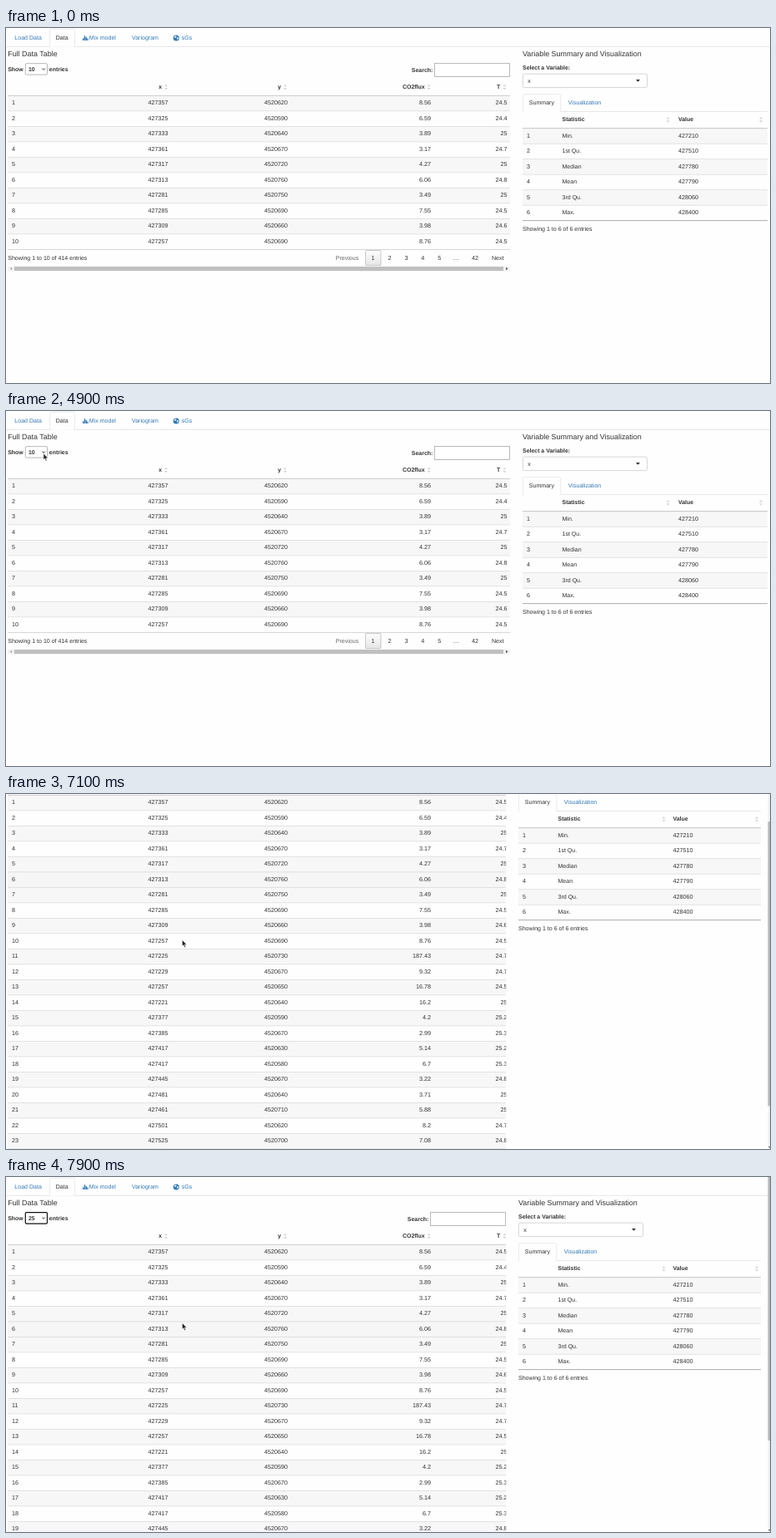
Animation of 917 by 427 pixels, one loop 8000 ms. Source, as an HTML page:

```html
<!DOCTYPE html>
<html lang="en">
<head>
<meta charset="utf-8">
<title>Data table</title>
<style>
html, body { margin: 0; width: 100%; height: 100%; overflow: hidden; background: #fefefe; }
svg { display: block; }
text { font: 7.05px "Liberation Sans", Arial, sans-serif; fill: #333; white-space: pre; text-rendering: geometricPrecision; }
.b { font-weight: bold; font-size: 6.95px; }
.h { font-size: 8.95px; }
.n { font-size: 7.2px; }
.link { fill: #337ab7; }
.dim { fill: #666; }
.on { fill: #fff; }
.end { text-anchor: end; }
.mid { text-anchor: middle; }
</style>
</head>
<body>
<svg id="stage" width="917" height="427" viewBox="0 0 917 427">
  <defs>
    <linearGradient id="button" x2="0" y2="1">
      <stop stop-color="#fdfdfd"/><stop offset="1" stop-color="#e6e6e6"/>
    </linearGradient>
    <filter id="shadow" x="-20%" y="-20%" width="140%" height="140%">
      <feDropShadow dx="0" dy="1" stdDeviation="1.3" flood-opacity=".35"/>
    </filter>
    <clipPath id="wide"><rect width="606" height="620"/></clipPath>
    <clipPath id="narrow"><rect width="600.3" height="620"/></clipPath>
  </defs>
  <g id="page">
    <g id="short"></g>
    <g id="long"></g>
    <rect id="hover" x="2" width="598" height="18.5" fill-opacity=".03"/>
    <g id="chosen10"></g>
    <g id="chosen25"></g>
  </g>
  <g id="menu"></g>
  <g id="bar">
    <rect x="914.5" width="2.5" height="427" fill="#f1f1f1"/>
    <rect id="thumb" x="914.5" width="2.5" height="342" fill="#b9b9b9"/>
    <path d="M915 424h2.4l-1.2 1.8z" fill="#555"/>
  </g>
  <path id="cursor" d="M0 0V7.6L1.7 6.1L2.9 9L4.2 8.4L3 5.7H5.3Z" fill="#222" stroke="#fff" stroke-width=".5"/>
</svg>
<script>
const $ = id => document.getElementById(id);
const ROW = 18.5, TOP = 81.25;

// x - 427000, y - 4520000, flux, T
const data = `357 620 8.56 24.5|325 590 6.59 24.4|333 640 3.89 25|361 670 3.17 24.7|317 720 4.27 25
313 760 6.06 24.8|281 750 3.49 25|285 690 7.55 24.5|309 660 3.98 24.6|257 690 8.76 24.5
225 730 187.43 24.7|229 670 9.32 24.7|257 650 16.78 24.5|221 640 16.2 25|377 590 4.2 25.2
385 670 2.99 25.3|417 630 5.14 25.2|417 580 6.7 25.3|445 670 3.22 24.8|481 640 3.71 25
461 710 5.88 25|501 620 8.2 24.7|525 700 7.08 24.8|553 740 8.54 24.6|593 700 14.77 25`
  .split(/[|\n]/).map(line => line.trim().split(' '));

const summary = [['Min.', 427210], ['1st Qu.', 427510], ['Median', 427780],
  ['Mean', 427790], ['3rd Qu.', 428060], ['Max.', 428400]];

// y is the middle of the capitals
const text = (x, y, str, cls = '') => `<text x="${x}" y="${y + 2.3}" class="${cls}">${str}</text>`;
const rect = (x, y, w, h, fill, more = '') =>
  `<rect x="${x}" y="${y}" width="${w}" height="${h}" fill="${fill}" ${more}/>`;
const path = (d, fill, more = '') => `<path d="${d}" fill="${fill}" ${more}/>`;
const line = (x, y, w, color = '#dcdcdc') => rect(x, y - .3, w, .8, color);
const frame = (x, y, w, h, color, r = 0) =>
  rect(x, y, w, h, '#fff', `rx="${r}" stroke="${color}" stroke-width=".8"`);
const sorter = (x, y) => path(`M${x - 2} ${y - .7}h4l-2 -2.6zM${x - 2} ${y + .9}h4l-2 2.6z`, '#d5d5d5');
const openTab = (x, y, w, h) =>
  path(`M${x} ${y + h}V${y + 2}q0 -2 2 -2H${x + w - 2}q2 0 2 2V${y + h}`, '#fefefe', 'stroke="#e2e2e2" stroke-width=".7"');

function nav() {
  return line(0, 22.2, 917, '#e2e2e2') + openTab(52.5, 1.2, 30, 21.6) +
    text(10.3, 12, 'Load Data', 'link') + text(59.7, 12, 'Data') +
    path('M92 12.2h1.4v2.9h-1.4zM93.8 9.2h1.4v5.9h-1.4zM95.6 10.9h1.4v4.2h-1.4zM97.3 12.6h1.3v2.5h-1.3z', '#337ab7') +
    text(99.8, 12, 'Mix model', 'link') + text(151, 12, 'Variogram', 'link') +
    '<circle cx="204.3" cy="12" r="3.6" fill="#337ab7"/>' +
    path('M202 10.2l1.8 -1 .9 1.2 -1.4 1.6 -1.2 -.3zM205 11.6l1.9 -.6 .3 1.8 -1.6 1.5z', '#dceaf5') +
    text(210.8, 12, 'sGs', 'link');
}

function table(count, dx) {
  const width = 603 + dx, bottom = TOP + count * ROW;
  let out = '';
  [['x', 187], ['y', 330], ['CO2flux', 502.6], ['T', 593.3]].forEach(([name, x]) =>
    out += text(x, 70.8, name, 'b end') + sorter(x + 5, 71));
  data.slice(0, count).forEach(([x, y, flux, temp], i) => {
    const top = TOP + i * ROW, mid = top + 8.9;
    if (i % 2 == 0) out += rect(2, top, width, ROW, '#f7f7f7');
    out += line(2, top, width, i ? undefined : '#c4c4c4') + text(7, mid, i + 1, 'n');
    [[194.6, '427' + x], [338, '4520' + y], [510, flux], [601.5, temp]].forEach(([right, value]) =>
      out += text(right, mid, value, 'n end'));
  });
  return `<g clip-path="url(#${dx ? 'narrow' : 'wide'})">${out}${line(2, bottom, width, '#ccc')}</g>`;
}

function pager(count, dx) {
  const y = TOP + count * ROW + 10.3, right = 605 + dx, barY = y + 10;
  let out = text(2.2, y - .3, `Showing 1 to ${count} of 414 entries`) +
    text(423.2 + dx, y, 'Previous', 'dim end') +
    rect(431.5 + dx, y - 9, 18.5, 18, 'url(#button)', 'rx="1" stroke="#b4b4b4" stroke-width=".7"');
  ['1', '2', '3', '4', '5', '…'].forEach((label, i) => out += text(440.6 + dx + i * 19.9, y, label, 'n mid'));
  return out + text(563 + dx, y, Math.ceil(414 / count), 'n mid') + text(583 + dx, y, 'Next') +
    rect(2, barY, right - 2, 6, '#f1f1f1') +
    rect(10, barY + .5, right - 18 + dx, 5, '#bfbfbf') +
    path(`M7 ${barY + 1.5}v3l-1.8 -1.5z`, '#888') +
    path(`M${right - 4.8} ${barY + 1.3}v3.4l2.2 -1.7z`, '#444');
}

function side(dx) {
  const x = 620 + dx, end = dx ? 906 : 914, w = end - x, shift = dx && dx - 1.5;
  let out = text(x, 31.9, 'Variable Summary and Visualization', 'h') +
    text(x, 47.2, 'Select a Variable:', 'b') +
    frame(x + .4, 55.2, 149.2, 16.4, '#ccc', 2) + text(x + 6.3, 63.2, 'x') +
    path(`M${x + 136} 62h5l-2.5 2.7z`, '#333') +
    line(x, 100.3, w, '#e2e2e2') + openTab(x + .4, 79.6, 45.4, 21.3) +
    text(x + 7.8, 90, 'Summary') + text(x + 54.8, 90, 'Visualization', 'link') +
    text(x + 47.5, 110.1, 'Statistic', 'b') + sorter(794.5 + dx, 110.3) +
    text(807 + shift, 110.1, 'Value', 'b') + sorter(906 + dx, 110.3);
  summary.forEach(([name, value], i) => {
    const top = 120.6 + i * ROW, mid = top + 9;
    if (i % 2 == 0) out += rect(x, top, w, ROW, '#f7f7f7');
    out += line(x, top, w, i ? undefined : '#b8b8b8') + text(x + 5, mid, i + 1, 'n') +
      text(x + 47.5, mid, name) + text(807 + shift, mid, value, 'n');
  });
  return out + line(x, 231.6, w, '#999') + text(x, 241.5, 'Showing 1 to 6 of 6 entries');
}

function layout(count, dx) {
  return nav() + text(2.2, 31.9, 'Full Data Table', 'h') +
    text(2.2, 49.4, 'Show', 'b') + text(51.8, 49.4, 'entries', 'b') +
    text(512.3 + dx, 50.2, 'Search:', 'b end') + frame(514.5 + dx, 42.4, 90, 16.1, '#aaa') +
    table(count, dx) + pager(count, dx) + side(dx);
}

const chooser = (value, color, weight) =>
  rect(23.3, 42.7, 26.2, 13.4, '#fff', `rx="1.3" stroke="${color}" stroke-width="${weight}"`) +
  text(27, 49.4, value, 'b') +
  path('M43.5 48.6l1.7 1.8 1.7 -1.8', 'none', 'stroke="#222" stroke-width=".9"');

const menu = active => rect(22.8, 56.6, 26.6, 49, '#fff', 'stroke="#888" stroke-width=".6" filter="url(#shadow)"') +
  [10, 25, 50, 100].map((value, i) => {
    const mid = 62.8 + 12 * i, on = value == active;
    return (on ? rect(22.9, mid - 6, 26.4, 12, '#1962c4') : '') + text(27.2, mid, value, on ? 'n on' : 'n');
  }).join('');

$('short').innerHTML = layout(10, 0);
$('long').innerHTML = layout(25, -5);
$('chosen10').innerHTML = chooser(10, '#999', .7);
$('chosen25').innerHTML = chooser(25, '#111', 1.2);

// [ms, value...]; every step holds until the next
const pointer = [[0, -20, -20], [500, 53, 1], [700, 72, 40], [900, 95, 84], [1100, 107, 96],
  [1300, 110.5, 82], [1500, 103, 76], [1700, 97, 74], [1900, 93, 73], [2100, 90.5, 72],
  [3500, 89.6, 71], [3700, 86, 70], [3900, 80, 68], [4100, 73, 66], [4300, 67, 65.5],
  [4700, 54, 58], [4900, 45, 51], [5500, 42, 60], [5700, 40, 70], [5900, 37.7, 76],
  [6300, 70, 98], [6500, 140, 142], [6700, 192, 168], [6900, 206.5, 174], [7100, 211.5, 175.5]];
const scrolling = [[0, 0], [7100, 80], [7300, 141.5], [7700, 60], [7900, 0]];
const picking = [[0, 0], [5100, 10], [5700, 25], [6100, 0]];

const at = (steps, t) => steps.findLast(step => step[0] <= t).slice(1);
const show = (id, on) => $(id).style.display = on ? '' : 'none';
let drawn = -1;

function draw(t) {
  const [x, y] = at(pointer, t), [scroll] = at(scrolling, t), [active] = at(picking, t);
  const long = t >= 6300;
  // the hovered row stays lit while the page scrolls under the pointer
  const row = Math.floor((y - TOP) / ROW);
  show('short', !long);
  show('long', long);
  show('bar', long);
  show('chosen10', t < 6100);
  show('chosen25', t >= 6100);
  show('menu', active);
  if (active) $('menu').innerHTML = menu(active);
  show('hover', long && row >= 0);
  $('hover').setAttribute('y', TOP + row * ROW);
  $('page').setAttribute('transform', `translate(0 ${-scroll})`);
  $('thumb').setAttribute('y', -25 + scroll * 103 / 141.5);
  $('cursor').setAttribute('transform', `translate(${x} ${y})`);
}

function tick() {
  const t = Math.floor(performance.now() % 8000 / 100) * 100;
  if (t != drawn) draw(drawn = t);
  requestAnimationFrame(tick);
}
tick();
</script>
</body>
</html>
```
